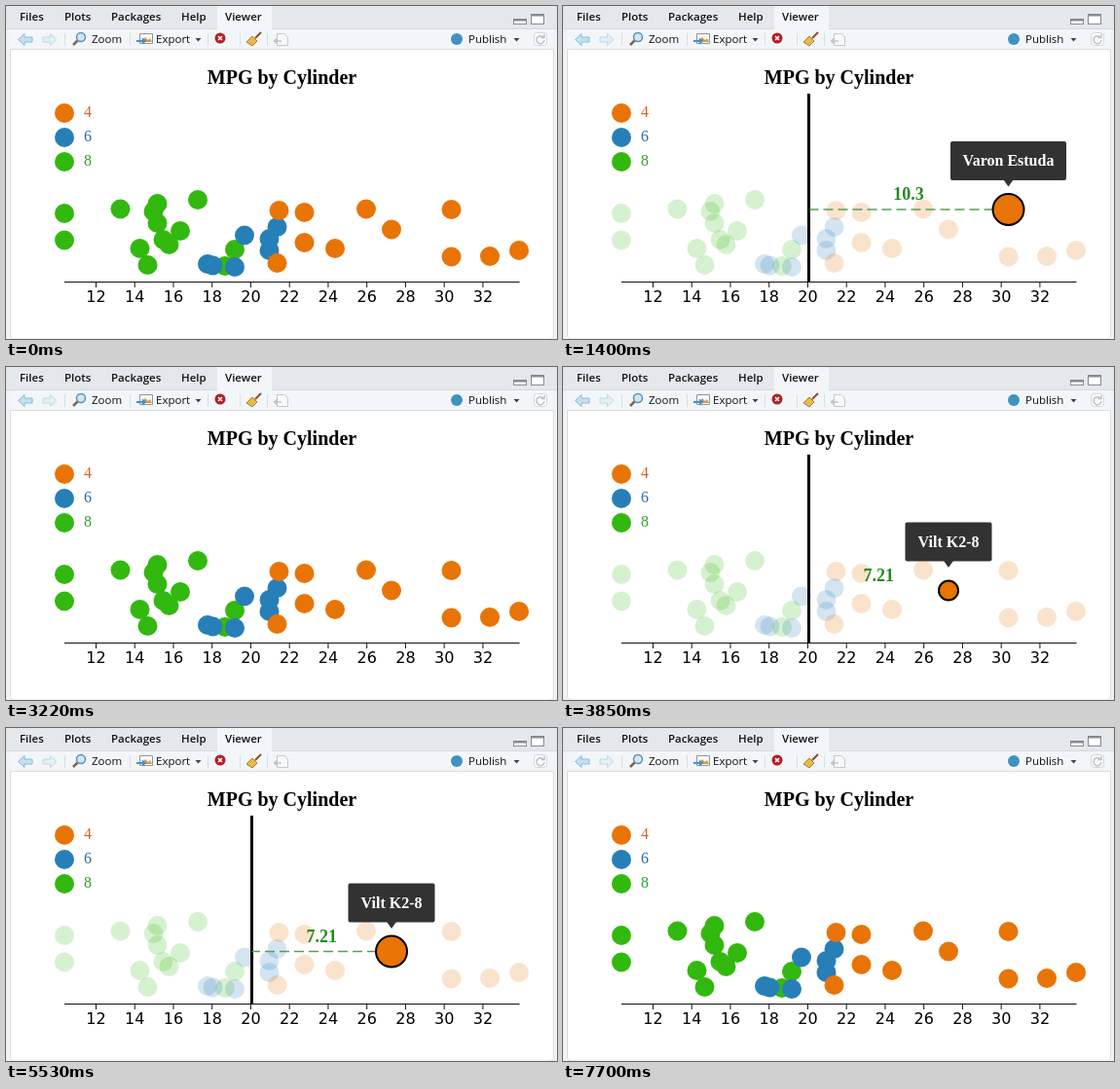
These frames come from a looping animation (566x342 px, 8000 ms). An HTML page:

```html
<!DOCTYPE html>
<html lang="en">
<head>
<meta charset="utf-8">
<title>MPG by Cylinder</title>
<style>
  html, body { margin: 0; width: 100%; height: 100%; overflow: hidden; background: #fff; }
  svg { display: block; width: 100vw; height: 100vh; }
  .ui { font: 11.5px "Open Sans", sans-serif; fill: #111; }
  .tabs { font-weight: 600; }
  .serif { font: 16px "Liberation Serif", serif; }
  .bold { font-weight: bold; text-anchor: middle; }
  .ticks { font: 16px "DejaVu Sans", sans-serif; text-anchor: middle; }
</style>
</head>
<body>
<svg viewBox="0 0 566 342">
  <!-- pane frame -->
  <rect width="566" height="342" fill="#f1f3f5"/>
  <rect width="566" height="23" fill="#e5e8ea"/>
  <path d="M217 24V0H273V24Z" fill="#f3f6f8"/>
  <path d="M0 23.5H217M273 23.5H566" stroke="#d5dadd"/>
  <rect x="4.5" y="24" width="558" height="20.5" fill="#f3f6f8"/>
  <path d="M4.5 44.5H562.5V338Q562.5 342 558 342H8Q4.5 342 4.5 338Z" fill="#fff" stroke="#d9dde0"/>

  <g class="ui tabs">
    <text x="14" y="15">Files</text>
    <text x="60" y="15">Plots</text>
    <text x="108" y="15">Packages</text>
    <text x="180" y="15">Help</text>
    <text x="225" y="15">Viewer</text>
  </g>
  <g class="ui">
    <text x="88" y="38">Zoom</text>
    <text x="154" y="38">Export</text>
    <text x="475" y="38">Publish</text>
  </g>

  <!-- window buttons -->
  <g fill="#fff" stroke="#858b90">
    <rect x="521.5" y="13.5" width="13" height="5"/>
    <rect x="539.5" y="8.5" width="13" height="10"/>
    <path d="M521 14.5H535M539 9.5H553" stroke-width="2"/>
  </g>

  <!-- toolbar icons -->
  <g stroke-linejoin="round">
    <path id="back" d="M12.5 34.5L19 28.5V32H27V37H19V40.5Z" fill="#c3e0f1" stroke="#8abbd8"/>
    <path d="M52 34.5L45.500 28.500V32H38V37H45.500V40.500Z" fill="#e2f0f7" stroke="#bdd8e7"/>
    <path d="M60.500 28V41M127.500 28V41M207.500 28V41M240.500 28V41M268.500 28V41" stroke="#d9dee1"/>
    <path d="M73.500 35.500L69 40" stroke="#80664e" stroke-width="2.500"/>
    <circle cx="77" cy="32" r="4.500" fill="#cfe7f5" stroke="#5d90b3" stroke-width="1.500"/>
    <rect x="137.500" y="28.500" width="13" height="10" fill="#f8fafb" stroke="#8b979e"/>
    <path d="M139 37L143 32L146 35L148 33L150 37Z" fill="#d49a4a"/>
    <path d="M134 35H140V32.500L144.500 36L140 39.500V37H134Z" fill="#4a8fc2"/>
    <path d="M194.500 33H200.500L197.500 36.500ZM521.500 33H527.500L524.500 36.500Z" fill="#444"/>
    <circle cx="220" cy="33" r="5.500" fill="#b51f24"/>
    <path d="M218 31L222 35M222 31L218 35" stroke="#fff" stroke-width="1.500"/>
    <path d="M262 27L256 33" stroke="#8c4c26" stroke-width="2"/>
    <path d="M253 31L258 36L253 41L247 37Z" fill="#e8b94e" stroke="#ad7d2d"/>
    <path d="M278.500 28.500H286L289.500 32V40.500H278.500Z" fill="#f8f9fa" stroke="#c3c9cd"/>
    <path d="M275 36H283M279 33L275.500 36L279 39" fill="none" stroke="#bcc5ca" stroke-width="1.500"/>
    <circle cx="463" cy="34" r="6" fill="#3f92c3"/>
    <rect x="542.500" y="27.500" width="13" height="13" rx="3" fill="#fafbfc" stroke="#d3d8db"/>
    <path d="M552 32A4 4 0 1 0 553 35M553 29V32.500H549.500" fill="none" stroke="#bcc3c7" stroke-width="1.500"/>
  </g>

  <!-- chart -->
  <text class="serif bold" x="283.500" y="80" style="font-size:20px">MPG by Cylinder</text>
  <g id="legend"></g>
  <g id="axis" class="ticks"><path d="M60 283.500H527.500" stroke="#111"/></g>
  <g id="points"></g>

  <g id="focus">
    <path d="M252.500 90V283" stroke="#000" stroke-width="3"/>
    <line id="gap" stroke="#57a052" stroke-width="1.500" stroke-dasharray="10 5"/>
    <text id="diff" class="serif bold" fill="#228b22" style="font-size:18px"></text>
    <circle id="dot" fill="#e87405" stroke="#000" stroke-width="2"/>
    <g id="tip">
      <rect id="tipBox" y="-70" height="40" rx="2" fill="#323232"/>
      <path d="M-5 -30.500H5L0 -23.500Z" fill="#323232"/>
      <text id="tipText" class="serif bold" y="-45" fill="#fff"></text>
    </g>
  </g>
</svg>
<script>
const LOOP = 8000, GROW = 1000, MEAN_X = 252.5;

const groups = [
  { label: 8, color: '#32b80f', ink: '#33a02c', y: 160, points: [
    [60, 213], [60, 240.500], [117.500, 208.500], [137.500, 249], [145.500, 266], [151.500, 211],
    [155.500, 203], [155.500, 223], [161.500, 240], [167.500, 245], [179, 231], [197, 199],
    [225, 267], [235, 250]] },
  { label: 6, color: '#277fb8', ink: '#2a6ca5', y: 135, points: [
    [207, 265], [212.500, 266.500], [235, 268], [245, 235.500], [270.500, 239], [270.500, 251],
    [278.500, 227]] },
  { label: 4, color: '#e87405', ink: '#cc6828', y: 110, points: [
    [278.500, 264], [280.500, 210], [306.500, 212], [306.500, 243], [338, 249], [370, 208.500],
    [396, 229.500], [457.500, 209], [457.500, 257.500], [497, 257], [527, 251]] }
];

const hovers = [
  { from: 500, to: 2800, x: 457.5, y: 209, name: 'Varon Estuda', diff: '10.3', width: 119 },
  { from: 3780, to: 5880, x: 396, y: 229.5, name: 'Vilt K2-8', diff: '7.21', width: 89 }
];

const el = id => document.getElementById(id);

function set(node, attrs) {
  for (const key in attrs) node.setAttribute(key, attrs[key]);
  return node;
}

function add(parent, tag, attrs, text = '') {
  const node = document.createElementNS('http://www.w3.org/2000/svg', tag);
  node.textContent = text;
  return el(parent).appendChild(set(node, attrs));
}

for (const { label, color, ink, y, points } of groups) {
  add('legend', 'circle', { cx: 60, cy: y, r: 10, fill: color });
  add('legend', 'text', { x: 80, y: y + 3.5, fill: ink, class: 'serif' }, label);
  for (const [cx, cy] of points) add('points', 'circle', { cx, cy, r: 10, fill: color });
}

for (let value = 12; value <= 32; value += 2) {
  const x = 92.5 + (value - 12) * 19.87;
  add('axis', 'path', { d: `M${x} 283V289`, stroke: '#111' });
  add('axis', 'text', { x, y: 304 }, value);
}

const cubicInOut = t => t < 0.5 ? 4 * t ** 3 : 1 - 4 * (1 - t) ** 3;

function draw(time) {
  const hover = hovers.find(h => time >= h.from && time < h.to);
  el('focus').style.display = hover ? '' : 'none';
  for (const point of el('points').children) point.style.opacity = hover ? 0.2 : 1;
  if (!hover) return;

  const { x, y, name, diff, width } = hover;
  const grow = cubicInOut(Math.min(1, (time - hover.from) / GROW));
  set(el('gap'), { x1: x, x2: x + (MEAN_X - x) * grow, y1: y, y2: y });
  set(el('dot'), { cx: x, cy: y, r: 10 + 6 * grow });
  set(el('diff'), { x: (x + MEAN_X) / 2, y: y - 10 }).textContent = diff;
  set(el('tip'), { transform: `translate(${x} ${y})` });
  set(el('tipBox'), { x: -width / 2, width });
  el('tipText').textContent = name;
}

function frame() {
  draw(performance.now() % LOOP);
  requestAnimationFrame(frame);
}
frame();
</script>
</body>
</html>
```
